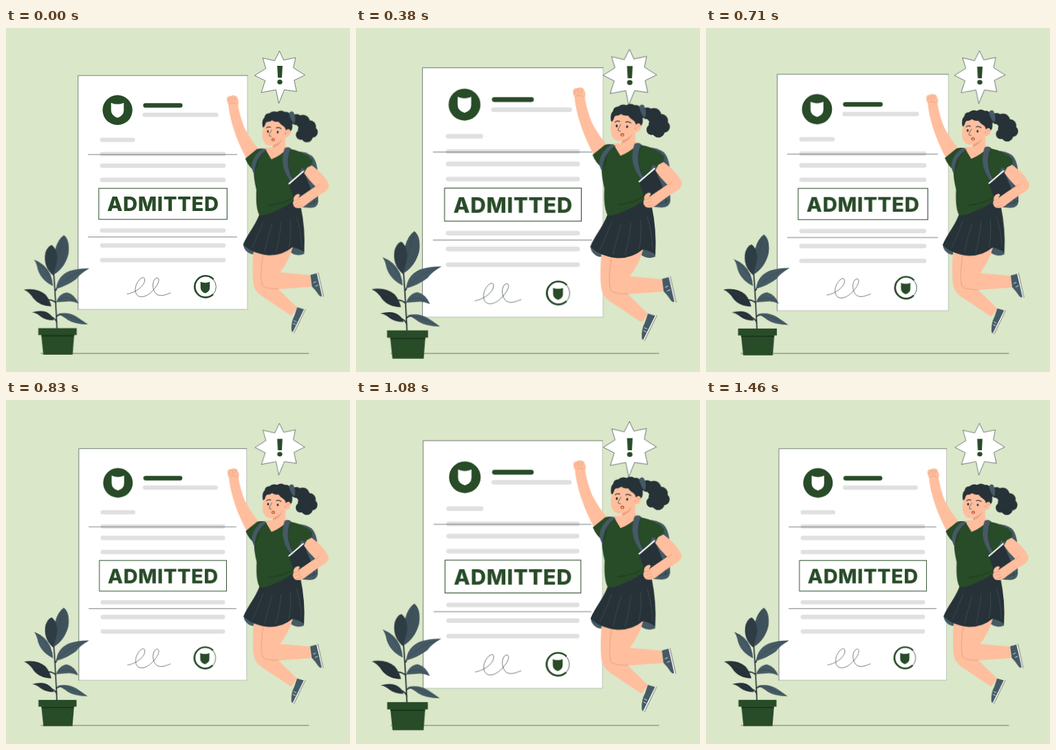
Recreate the animation shown at these times as an HTML page. Size 500 by 500 pixels, loop 1.5 s.

```html
<!DOCTYPE html>
<html lang="en">
<head>
<meta charset="utf-8">
<title>Admitted</title>
<style>
  html, body { margin: 0; width: 100%; height: 100%; overflow: hidden; background: #dae7c8; }
  svg { display: block; width: 100vw; height: 100vh; }
  .green { fill: #284b28; }
  .dark { fill: #263238; }
  .slate { fill: #455a64; }
  .skin { fill: #ffbe9d; }
  .white { fill: #fff; }
  .line { fill: none; stroke: #263238; stroke-width: .6; stroke-linecap: round; }
  .crease { fill: none; stroke: #e39a7a; stroke-width: .7; stroke-linecap: round; }
  .vein { fill: none; stroke: #37474f; stroke-width: .5; }
  .pleat { fill: none; stroke: #47565e; stroke-width: .6; }
  .bars { stroke: #e0e0e0; stroke-width: 6.2; stroke-linecap: round; }
  .stamp { font: 800 28.8px Inter, "Noto Sans", sans-serif; letter-spacing: .6px; text-anchor: middle; }
  .bang { font: 800 36px "Open Sans", "Noto Sans", sans-serif; text-anchor: middle; }
</style>
</head>
<body>
<svg viewBox="0 0 500 500">
  <path class="line" d="M51 473H440"/>

  <g class="beat" data-origin="228 239">
    <rect class="white" x="106.5" y="71.5" width="242.7" height="335"/>
    <path class="line" d="M106.5 406.5V71.5H349.2"/>
    <path class="line" opacity=".4" d="M106.5 406.5H349.2V71.5"/>
    <circle class="green" cx="163" cy="121" r="21.4"/>
    <path class="white" d="M153.800 110.500Q158 112.700 163 112.400Q168 112.700 172 110.500V121.500Q172 129 163 132Q154 129 153.800 121.500Z"/>
    <path stroke="#284b28" stroke-width="6.4" stroke-linecap="round" d="M203 114.2H253"/>
    <g id="bars" class="bars"></g>
    <path class="line" d="M121 184.700H334M121 302.900H334"/>
    <rect x="136.2" y="233.2" width="183.8" height="44.4" fill="#fff" stroke="#284b28"/>
    <text class="stamp green" x="228.3" y="266">ADMITTED</text>
    <path class="line" d="M177 384.500C189 383 205 371 201.500 362C198 357 186 371 189 382C192 393 206 389 214 379C222 371 225 361 219 361.500C212 364 212 379 219 385C226 389 233 385 239 383"/>
    <circle cx="288.5" cy="374.3" r="15.8" fill="none" stroke="#284b28" stroke-width=".8"/>
    <path d="M300.5 363.5A15.4 15.4 0 1 0 300 385" fill="none" stroke="#284b28" stroke-width="2.4"/>
    <path class="green" d="M282 367Q285 368.700 288.700 368.300Q292 368.700 295.300 367V375Q295.500 381 288.700 383.500Q282 381 282 375Z"/>
  </g>

  <g class="beat" data-origin="398 72">
    <path d="M397.5 34L403.5 47L420.5 43.5L417.5 58L434 68.5L418.5 76L422 92L404.5 89.5L396.5 109L392.5 89.5L371.5 93.5L377 76.5L362 69L378 59L373.5 44L390.5 48Z" fill="#fff" stroke="#263238" stroke-width=".6"/>
    <text class="bang green" x="398" y="82.2">!</text>
  </g>

  <g class="beat" data-origin="73.7 388">
    <g transform="translate(-.5 -.7)">
      <path class="line" style="stroke-width:1.7" d="M74.5 437Q73 400 69.5 352M73 382Q76 372 84 366M73 400Q67 395 62 396M74.5 428Q72 422 66 420M73.5 420Q77 416 84 417"/>
      <path fill="#3f525c" d="M69.5 360Q67 315 84.5 303Q93.5 310 91 330Q86 350 69.5 360Z"/>
      <path fill="#2e3c44" d="M69.5 361Q54 348 58 328Q61 319 67 317Q77 325 74 343Z"/>
      <path class="slate" d="M69 376Q52 368 47 352Q45 342 41.5 338Q58 344 65 359Q68 367 69 376Z"/>
      <path class="dark" d="M66.5 405Q50 405 41 394Q35 384 27 381Q46 378 58 388Q64 395 66.5 405Z"/>
      <path class="slate" d="M73.5 380Q75 362 92 354.5Q107 350 121 350.5Q108 358 102 366Q90 375 73.5 380Z"/>
      <path class="slate" d="M73.5 399Q78 386 89 385Q100 388 105.5 401Q97 397 89 398Z"/>
      <path class="dark" d="M70 425Q58 425 51 419.5Q45 414 38.5 413.5Q56 409 64 416Q69 420 70 425Z"/>
      <path class="slate" d="M75 416Q90 412 103 420Q112 426 119 431Q100 431 90 424.5Q82 418 75 416Z"/>
      <path class="vein" d="M70 358Q76 330 84 305M68 370Q58 350 43 339M64 402Q52 387 30 381M76 377Q92 359 118 351.5M76 396Q87 388 104 399M68 423Q58 415 41 413.5M78 416Q97 420 117 430.5"/>
    </g>
    <path class="green" d="M51.5 445H98.7L96.5 473.5H54.5Z"/>
    <rect class="green" x="47.3" y="435.6" width="55" height="9.8"/>
    <path d="M51.500 445.400H98.700L98.500 447.500H51.700Z" fill="#1b351c"/>
  </g>

  <g class="beat" data-origin="407 269.8">
    <g id="curls" class="dark"></g>
    <path class="slate" d="M404 184Q428 176 444 187Q453 195 453 222V253Q452 262 441 261.5L420 260Z"/>
    <path class="line" d="M437 185Q447 194 447 220V256M424 255Q440 260 452 251"/>

    <path class="skin" d="M324.500 116Q329 150 348 187Q352 195 359 191L368 178Q355 162 347.500 147Q341 131 338 113Z"/>
    <g transform="translate(.8 0)">
      <path class="skin" d="M325.5 121Q324 114 322 110Q320 103 324 101.5Q327 101 328 101Q331 99 333 101Q336 101 336.5 104Q339 108 338 112L336 121Z"/>
      <path class="crease" d="M324 108Q325 104 328 102M328 109Q330 107 329 103M332 108Q334 106 333 102M326 112Q331 109 335 113"/>
    </g>

    <path class="slate" d="M345.5 314Q347 325 358 328L375 326L360 310ZM409 321Q420 333 433 327.5L432 300Z"/>
    <path class="skin" d="M360.500 322C358.500 345 359 365 361 373Q363 381 371 387L414.500 416L423 404.500L396 378L443 374.500L442 358L398.500 354Q411 338 417 317L380 308Z"/>
    <path class="crease" d="M374 328Q369 360 373 373Q378 378 396 377.5"/>

    <path class="slate" d="M423 404L433 407L420 437Q416 442 414.7 437Q414 425 419 416Z"/>
    <path d="M433.8 407L417.5 440" stroke="#fff" stroke-width="2"/>
    <path class="line" d="M434.7 407L418.5 440.5"/>
    <path class="slate" d="M442 357.5L451.5 355L459.5 386Q458 391 454 386.5Q450 380 444 374Z"/>
    <path d="M452 354.8L459.7 388.5" stroke="#fff" stroke-width="2"/>
    <path class="line" d="M453 354.5L460.7 388.5"/>
    <path d="M418 423l4 2M417 427l4 2M446 369l4-2M449 374l4-2" stroke="#fff" stroke-width=".8"/>

    <path class="dark" d="M369 270C363 287 351 300 345.500 314Q358 327 382 329.500Q402 330 416 318Q427 320 433 325Q435 292 428 259L420 246Q395 262 369 270Z"/>
    <path class="pleat" d="M374 281Q368 298 358 319M387 284Q380 306 376 325M400 282Q398 305 392 326M413 278Q415 300 411 318M422 274Q429 296 429 318"/>

    <path class="skin" d="M379 132Q372.500 147 373 158Q374 171 384 172.500L388.500 171.500L387 175L376 176L385 196L404 190L412 176L406 173V160Q413 160 413.500 153L411 132Z"/>
    <path d="M388.5 171.5Q397 169 402 162Q397 174 388 175Z" fill="#eda17f"/>

    <path class="green" d="M348.500 191L365 177.500Q371 175.500 377 177L386 192Q399 187 409 176.500Q430 179 445 193Q444 203 438 208L429 204Q421 222 419 243L421 249Q406 261 392 266Q380 272.500 369 272.500Q363 262 364.500 236Q360 217 361 208Q353 202 348.500 191Z"/>
    <path d="M382 258Q407 255 418 246M363 207Q367 202 367 194" fill="none" stroke="#19341a" stroke-width=".7"/>
    <path class="slate" d="M373 177Q377 176 379 179Q362 190 362 214Q357 207 358 198Q361 185 373 177Z"/>
    <path class="slate" d="M405 176Q412 173 414 177Q408 190 411 205Q413 215 418 222L414 224Q403 210 402 196Q402 184 405 176Z"/>
    <path class="line" d="M379 179Q362 190 362 214M414 177Q408 190 411 205Q413 215 418 222"/>

    <path class="dark" d="M411.5 228L432.5 210L444 237L420 253Z"/>
    <path d="M410.8 227.3L432.3 208.8" stroke="#fff" stroke-width="2"/>
    <path class="skin" d="M437 204L444 200.5Q462 214 467.5 226Q471 234 460 240Q446 249 436 257Q428 264 420 261Q415 256 418 251Q417 246 421 243Q425 240 427 243Q426 246 424 248Q434 241 449 231Q440 222 433 212Z"/>
    <path class="crease" d="M419 251L427 249M419 256L428 253M422 260L430 257M449 231Q453 231 455 227"/>

    <path class="dark" d="M373.500 146Q371.500 136 376 132Q377 126 383 126Q388 121.500 394 124Q400 120.500 405 124Q411 123 414 129Q419 134 416 142Q417 152 411 153Q410 158 406 156Q408 148 404 145Q399 142 396 138Q390 139 387 136Q383 139 380 138Q377 140 377 143Q375 147 373.500 146Z"/>
    <path class="slate" d="M411 126Q415 121 418 125Q422 133 419 141Q414 138 411 126Z"/>
    <path class="skin" d="M406 151Q411 146 413.5 151Q413 159 407 160Z"/>
    <path class="crease" d="M408 154Q410 151 412 152"/>
    <path class="line" style="stroke-width:1.1" d="M379 147Q381 144.5 385 146M393 147Q396 145 400 148"/>
    <path class="line" d="M386.5 150Q382 157 383 158.5L386 159"/>
    <ellipse class="dark" cx="381" cy="152" rx="1.3" ry="1.9"/>
    <ellipse class="dark" cx="395" cy="153" rx="1.3" ry="1.9"/>
    <ellipse cx="388.5" cy="163.8" rx="2.5" ry="2.2" fill="#b9553b"/>
    <ellipse cx="388.5" cy="164" rx="1.2" ry="1" fill="#ffbe9d"/>
  </g>
</svg>
<script>
  const ns = "http://www.w3.org/2000/svg";
  const add = (id, tag, attrs) => {
    const el = document.createElementNS(ns, tag);
    for (const k in attrs) el.setAttribute(k, attrs[k]);
    document.getElementById(id).append(el);
  };

  // Grey text rows: left, right, y
  const rows = [[202, 304.5, 127.8], [141, 185, 163.6]];
  for (const y of [184, 200.7, 221, 293.7, 315, 336]) rows.push([141, 315, y]);
  for (const [x, end, y] of rows) add("bars", "path", { d: `M${x} ${y}H${end}` });

  // Ponytail: x, y, radius
  for (const [cx, cy, r] of [[422, 135, 8], [431, 138, 10], [441, 145, 9], [444.5, 153, 8],
    [437, 159, 8.5], [428, 157, 7], [434, 150, 10]]) add("curls", "circle", { cx, cy, r });

  const beat = [[0, 1], [.2, 1.1], [.59, 1], [.79, 1.1], [1, 1]]
    .map(([offset, s]) => ({ offset, transform: `scale(${s})` }));
  for (const el of document.querySelectorAll(".beat")) {
    const [x, y] = el.dataset.origin.split(" ");
    el.style.transformOrigin = `${x}px ${y}px`;
    el.animate(beat, { duration: 1500, delay: -26, iterations: Infinity });
  }
</script>
</body>
</html>
```
